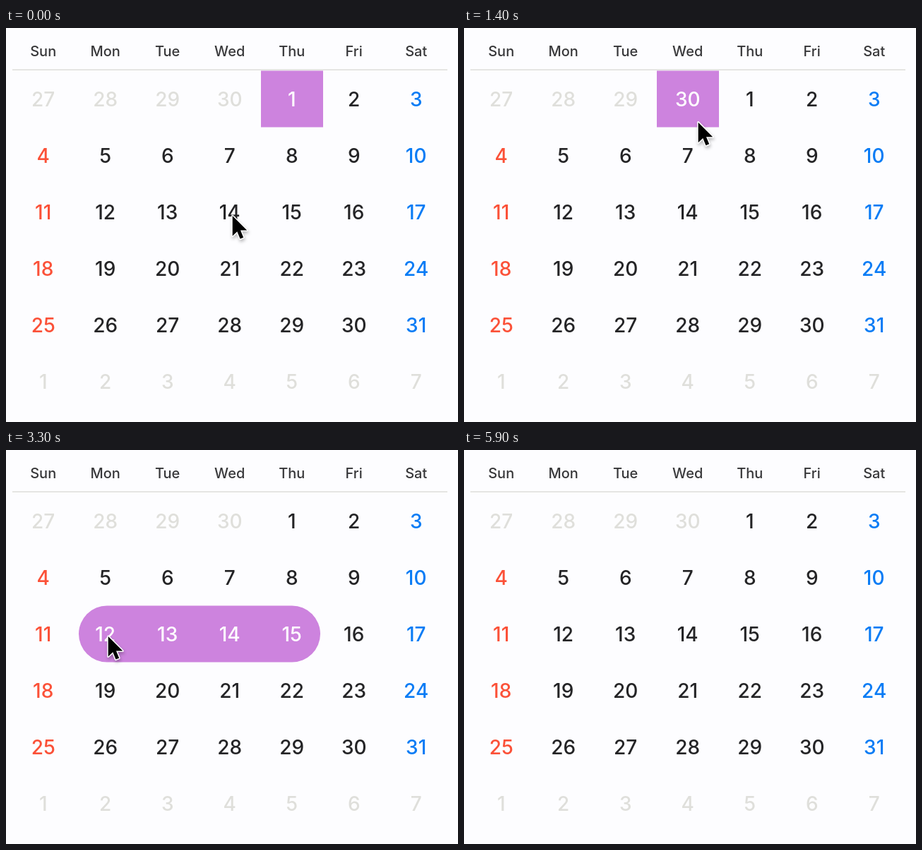
Recreate the animation shown at these times as an HTML page. Size 640 by 558 pixels, loop 6000 ms.

```html
<!DOCTYPE html>
<html lang="en">
<head>
<meta charset="utf-8">
<title>Date range calendar</title>
<style>
  html, body { margin: 0; width: 100%; height: 100%; overflow: hidden; background: #fdfdff; }
  svg { display: block; width: 640px; height: 558px; }
  text { font: 500 28px Inter, "Open Sans", sans-serif; text-anchor: middle; fill: #242426; }
  .head { font-size: 20px; fill: #38383a; }
  .sun { fill: #fb5138; }
  .sat { fill: #0a7cf5; }
  .out { fill: #dfdfdb; }
  .on { fill: #fff; }
  #range { fill: #cd83de; }
  #rule { fill: #dededa; }
  #cursor { filter: drop-shadow(1px 3px 2px rgba(0, 0, 0, .25)); }
  #cursor path { fill: #000; stroke: #fff; stroke-width: 3px; paint-order: stroke; stroke-linejoin: round; }
</style>
</head>
<body>
<svg viewBox="0 0 640 558">
  <rect id="rule" x="9" y="58.5" width="616" height="1.5"/>
  <path id="range"/>
  <g id="labels"></g>
  <g id="cursor"><path d="M0 0V28.5L6.6 22.3L10.8 32.6L15.5 30.7L11.3 20.6H20.5Z"/></g>
</svg>
<script>
const LOOP = 6000, STEP = 100, PAUSE = 100, HIDE = 5700;
const LEFT = 9, TOP = 60.5, W = 88, H = 80, R = 40;
const FIRST = 4, LENGTH = 31, PREV_LENGTH = 30;
const $ = id => document.getElementById(id);
const colOf = cell => cell % 7, rowOf = cell => Math.floor(cell / 7);
const cellOf = day => FIRST + day - 1;
const midX = col => LEFT + (col + .5) * W - .3;
const midY = row => TOP + (row + .5) * H + .5;

// Each click: time, day of the month (0 is the last of the previous one), pointer offset.
const clicks = [
  [300, 14, 4, 5], [1200, 0, -12, -21], [1700, 15, 4, 26], [2300, 15, 4, -2],
  [2900, 12, 4, 3], [3500, 12, 4, 3], [4200, 15, 4, 9], [4700, 15, 12, 7], [5400, 15, 12, 7]
].map(([time, day, dx, dy]) => {
  const cell = cellOf(day);
  return { time, cell, x: midX(colOf(cell)) + dx, y: midY(rowOf(cell)) + dy };
});

function addText(str, x, y, cls) {
  const el = document.createElementNS("http://www.w3.org/2000/svg", "text");
  el.setAttribute("x", x);
  el.setAttribute("y", y);
  el.setAttribute("class", cls);
  el.textContent = str;
  return $("labels").appendChild(el);
}

["Sun", "Mon", "Tue", "Wed", "Thu", "Fri", "Sat"].forEach((d, i) => addText(d, midX(i), 40, "head"));

const cells = Array.from({ length: 42 }, (_, i) => {
  const col = colOf(i), n = i - FIRST + 1;
  const day = n < 1 ? n + PREV_LENGTH : n > LENGTH ? n - LENGTH : n;
  const cls = n !== day ? "out" : col === 0 ? "sun" : col === 6 ? "sat" : "day";
  return { cls, el: addText(day, midX(col), midY(rowOf(i)) + 10, cls) };
});

// A click extends a single day to a range, clears that same day, or starts anew.
function select(sel, cell) {
  if (sel.length !== 1) return [cell];
  return sel[0] === cell ? [] : [sel[0], cell].sort((a, b) => a - b);
}

function selectionAt(t) {
  return clicks.filter(c => c.time <= t).reduce((sel, c) => select(sel, c.cell), [cellOf(1)]);
}

function rangePath(a, b) {
  let d = "";
  for (let row = rowOf(a); row <= rowOf(b); row++) {
    const from = Math.max(a, row * 7), to = Math.min(b, row * 7 + 6);
    const y = TOP + row * H, bottom = y + H;
    const x0 = LEFT + colOf(from) * W, x1 = LEFT + (colOf(to) + 1) * W;
    const roundL = a !== b && from === a, roundR = a !== b && to === b;
    const l = roundL ? x0 + R + 6 : x0, r = roundR ? x1 - R - 4 : x1;
    d += `M${l} ${y}H${r}`;
    d += roundR ? `A${R} ${R} 0 0 1 ${r} ${bottom}` : `V${bottom}`;
    d += `H${l}`;
    d += roundL ? `A${R} ${R} 0 0 1 ${l} ${y}Z` : "Z";
  }
  return d;
}

// The pointer glides between clicks and rests around each one.
function pointerAt(t) {
  const next = clicks.find(c => c.time > t) || clicks.at(-1);
  const prev = clicks.filter(c => c.time <= t).pop() || next;
  const begin = prev.time + PAUSE, span = next.time - PAUSE - begin;
  const p = span > 0 ? Math.min(1, Math.max(0, (t - begin) / span)) : 0;
  const e = p * p * (3 - 2 * p);
  return [prev.x + (next.x - prev.x) * e, prev.y + (next.y - prev.y) * e];
}

let shown = -1;
function draw(now) {
  const t = Math.floor(now % LOOP / STEP) * STEP;
  if (t === shown) return;
  shown = t;
  const sel = selectionAt(t), a = sel[0], b = sel.at(-1);
  $("range").setAttribute("d", sel.length ? rangePath(a, b) : "");
  cells.forEach((c, i) => c.el.setAttribute("class", i >= a && i <= b ? "on" : c.cls));
  $("cursor").setAttribute("transform", `translate(${pointerAt(t)})`);
  $("cursor").style.display = t < HIDE ? "" : "none";
}

const start = performance.now();
function tick() {
  draw(performance.now() - start);
  requestAnimationFrame(tick);
}
tick();
</script>
</body>
</html>
```
